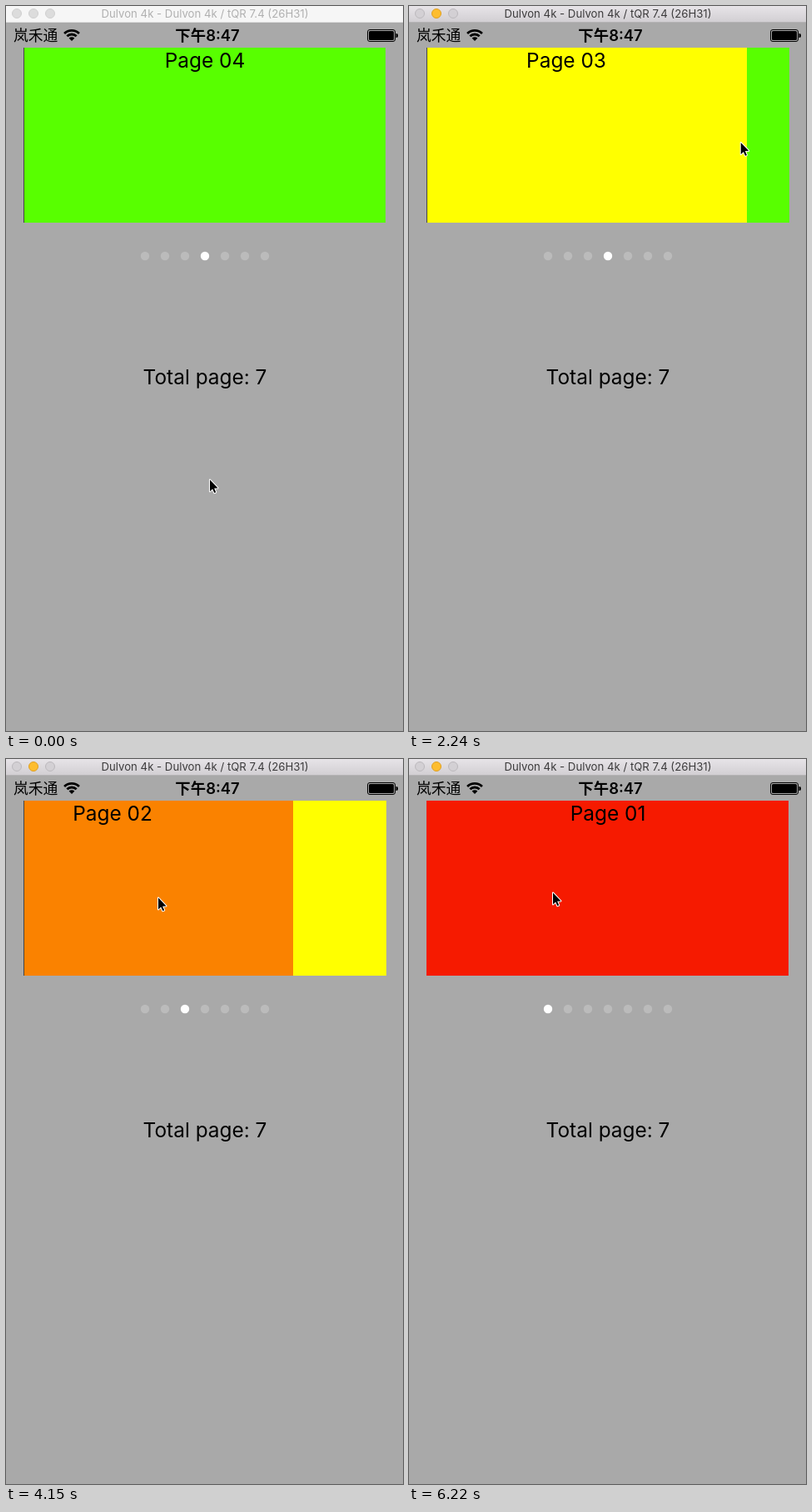
An HTML page with a canvas for the animation above (8000 ms loop, 477x870 px).

```html
<!DOCTYPE html>
<html lang="zh">
<head>
<meta charset="utf-8">
<style>
  html, body { margin: 0; width: 100%; height: 100%; overflow: hidden; background: #a9a9a9; }
  canvas { display: block; }
</style>
</head>
<body>
<canvas id="stage" width="477" height="870"></canvas>
<script>
const ctx = document.getElementById('stage').getContext('2d');
const LOOP = 8000, START = 450, TICK = 147.95;
const PAGE_X = 21, PAGE_W = 435;
const COLORS = ['#f61a00', '#fa8200', '#ffff00', '#58ff00'];
const FONT = 'Inter, "Noto Sans CJK SC", "Noto Sans CJK", sans-serif';

// Durations are in ticks; drag is the distance pulled before letting go
const SWIPES = [
  { begin: 7, pull: 3, hold: 0, settle: 5, drag: 201 },
  { begin: 18, pull: 7, hold: 0, settle: 4, drag: 324 },
  { begin: 30, pull: 3, hold: 1, settle: 5, drag: 54 }
];
const HOME = { x: 244, y: 567 };
const MOVES = [
  { from: -1, to: 4, x: 220, y: 165 },
  { from: 7, to: 10, x: 459, y: 163 },
  { from: 10, to: 17, x: 150, y: 160 },
  { from: 18, to: 25, x: 182, y: 165 },
  { from: 25, to: 31, x: 178, y: 154 },
  { from: 31, to: 33, x: 230, y: 156 },
  { from: 34, to: 39, x: 172, y: 159 }
];

const clamp = u => Math.max(0, Math.min(1, u));
const smooth = u => u * u * (3 - 2 * u);

// Accelerates while pulled, then the rest shrinks by a fixed ratio until it snaps
function swipeOffset({ begin, pull, hold, settle, drag }, tick) {
  const pulled = drag * clamp((tick - begin) / pull) ** 2;
  const free = tick - begin - pull - hold;
  if (free <= 0) return pulled;
  return free < settle ? PAGE_W - (PAGE_W - drag) * 0.46 ** free : PAGE_W;
}

function pointerAt(tick) {
  return MOVES.reduce((p, m) => {
    const u = smooth(clamp((tick - m.from) / (m.to - m.from)));
    return { x: p.x + (m.x - p.x) * u, y: p.y + (m.y - p.y) * u };
  }, HOME);
}

function rect(x, y, w, h, color) {
  ctx.fillStyle = color;
  ctx.fillRect(x, y, w, h);
}

function disc(x, y, r, color, border) {
  ctx.beginPath();
  ctx.arc(x, y, r, 0, Math.PI * 2);
  ctx.fillStyle = color;
  ctx.fill();
  if (!border) return;
  ctx.strokeStyle = border;
  ctx.lineWidth = 1;
  ctx.stroke();
}

function text(str, x, y, size, color = '#000', align = 'center', weight = 400) {
  ctx.font = `${weight} ${size}px ${FONT}`;
  ctx.textAlign = align;
  ctx.fillStyle = color;
  ctx.fillText(str, x, y);
}

function titleBar(active) {
  const shade = ctx.createLinearGradient(0, 0, 0, 19);
  shade.addColorStop(0, active ? '#e7e4e8' : '#f6f6f6');
  shade.addColorStop(1, active ? '#d2cfd3' : '#f6f6f6');
  rect(0, 0, 477, 19, shade);
  rect(0, 19, 477, 1, active ? '#b5b3b5' : '#dcdcdc');
  [13, 33, 53].forEach((x, i) => {
    if (!active) disc(x, 9, 5.5, '#dcdcdc', '#d0d0d0');
    else if (i === 1) disc(x, 9, 5.5, '#fdbd2f', '#dfa023');
    else disc(x, 9, 5.5, '#d3d0d4', '#bcb9bd');
  });
  text('Dulvon 4k - Dulvon 4k / tQR 7.4 (26H31)', 239, 14, 13.2, active ? '#3c3b3c' : '#b0b0b0');
}

function statusBar() {
  text('岚禾通', 9, 42, 17.8, '#000', 'left');
  text('下午8:47', 242, 42, 18.4, '#000', 'center', 600);

  const from = -Math.PI * 0.75, to = -Math.PI * 0.25;
  ctx.fillStyle = '#000';
  for (let outer = 14; outer > 4; outer -= 4.6) {
    ctx.beginPath();
    ctx.arc(79, 42, outer, from, to);
    ctx.arc(79, 42, outer > 5 ? outer - 2.8 : 0, to, from, true);
    ctx.fill();
  }

  ctx.strokeStyle = '#000';
  ctx.lineWidth = 1;
  ctx.beginPath();
  ctx.roundRect(434.5, 28.5, 33, 14, 2.5);
  ctx.stroke();
  ctx.beginPath();
  ctx.roundRect(436, 30, 30, 11, 1.5);
  ctx.roundRect(468.5, 33, 2.5, 5, [0, 2, 2, 0]);
  ctx.fill();
}

function pager(scroll) {
  const resting = scroll % PAGE_W === 0;
  ctx.save();
  ctx.beginPath();
  ctx.rect(PAGE_X, 50, resting ? PAGE_W : PAGE_W + 1, 210);
  ctx.clip();
  COLORS.forEach((color, i) => {
    const x = PAGE_X + (i - 3) * PAGE_W + Math.round(scroll);
    rect(x, 50, PAGE_W + 1, 210, color);
    text('Page 0' + (i + 1), x + 218, 74, 24.4);
  });
  if (scroll <= 2 * PAGE_W) rect(PAGE_X, 50, 1, 210, '#444');
  ctx.restore();

  const current = 3 - Math.floor(scroll / PAGE_W);
  for (let i = 0; i < 7; i++) disc(167 + 24 * i, 300, 5.2, i === current ? '#fff' : '#bbb');
}

function pointer({ x, y }) {
  ctx.save();
  ctx.translate(x + 1, y + 1.5);
  const arrow = new Path2D('M0 0V14L3.2 11L5.3 15.8L7.2 15L5.1 10.2L9.5 9.9Z');
  ctx.lineJoin = 'round';
  ctx.lineWidth = 2;
  ctx.strokeStyle = '#fff';
  ctx.stroke(arrow);
  ctx.fillStyle = '#000';
  ctx.fill(arrow);
  ctx.restore();
}

function draw(now) {
  // The screen updates in discrete ticks
  const tick = Math.floor((now % LOOP - START + 5) / TICK);
  rect(0, 0, 477, 870, '#a9a9a9');
  titleBar(tick > SWIPES[0].begin);
  statusBar();
  pager(SWIPES.reduce((sum, swipe) => sum + swipeOffset(swipe, tick), 0));
  text('Total page: 7', 239, 454, 24.4);
  pointer(pointerAt(tick));
  requestAnimationFrame(draw);
}
requestAnimationFrame(draw);
</script>
</body>
</html>
```
